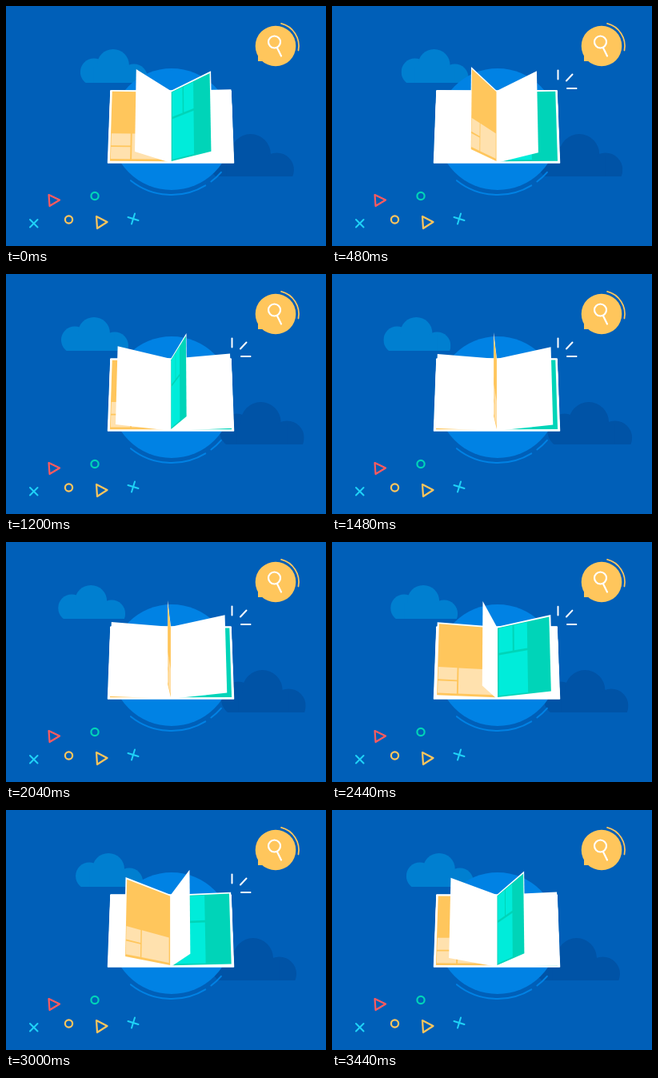
An HTML page with a canvas for the animation above (3480 ms loop, 400 px wide and 300 px high).

```html
<!DOCTYPE html>
<html lang="en">
<head>
<meta charset="utf-8">
<title>Flipping book</title>
<style>
  html, body { margin: 0; width: 100%; height: 100%; overflow: hidden; background: #005fb8; }
  canvas { display: block; }
</style>
</head>
<body>
<canvas id="stage" width="400" height="300"></canvas>
<script>
const ctx = document.getElementById('stage').getContext('2d');
const LOOP = 3480, BURST = 870, RAD = Math.PI / 180;
const YELLOW = '#ffc65c', TEAL = '#00d4b8', CYAN = '#1fd3f7', WHITE = '#fff', GLOW = '#0082e4';

// Flip progress in degrees at given times; a pair of leaves follows every PAIR degrees.
const PAIR = 143, LEAD = 76.5;
const flip = [[0, 54.6], [920, 475], [1480, 725], [2040, 1011], [2440, 1220],
              [3000, 1537.6], [3440, 1756], [LOOP, 54.6 + 12 * PAIR]];

// Cells as [u0, v0, u1, v1]: u from spine to outer edge, v from top to bottom.
const orangePage = { fill: YELLOW, light: '#ffe1ae',
  cells: [[.65, .6, .96, .765], [.65, .785, .96, .95], [.04, .6, .625, .95]] };
const tealPage = { fill: TEAL, light: '#00ecda',
  cells: [[.04, .03, .29, .37], [.32, .03, .56, .37], [.04, .4, .56, .96]] };

const clamp = x => Math.max(0, Math.min(1, x));

function polygon(points, color) {
  ctx.beginPath();
  points.forEach(p => ctx.lineTo(...p));
  ctx.closePath();
  ctx.fillStyle = color;
  ctx.fill();
}

function disc(x, y, r, color) {
  ctx.beginPath();
  ctx.arc(x, y, r, 0, 7);
  ctx.fillStyle = color;
  ctx.fill();
}

function stroke(color, width) {
  ctx.strokeStyle = color;
  ctx.lineWidth = width;
  ctx.stroke();
}

function arc(x, y, r, from, to, color, width = 2) {
  ctx.beginPath();
  ctx.arc(x, y, r, from * RAD, to * RAD);
  stroke(color, width);
}

function line(points, color, width = 2, closed = false) {
  ctx.beginPath();
  points.forEach(p => ctx.lineTo(...p));
  if (closed) ctx.closePath();
  stroke(color, width);
}

function cloud(x, y, scale, color) {
  ctx.save();
  ctx.translate(x, y);
  ctx.scale(scale, scale);
  ctx.beginPath();
  ctx.rect(0, -50, 84, 50);
  ctx.clip();
  disc(17, -13.5, 17, color);
  disc(41, -22, 20, color);
  disc(67, -6.5, 17, color);
  ctx.fillRect(17, -20, 50, 20);
  ctx.restore();
}

function flipAt(t) {
  const i = flip.findIndex(([time]) => time > t);
  const [t0, a] = flip[i - 1], [t1, b] = flip[i];
  return a + (b - a) * (t - t0) / (t1 - t0);
}

// Softens the lift-off and the landing of a leaf.
function leafAngle(x) {
  if (x < 12) return 12 * Math.exp((x - 12) / 12);
  if (x > 160) return 180 - 20 * Math.exp((160 - x) / 20);
  return x;
}

function drawLeaf({ angle, colored }) {
  const cos = Math.cos(angle * RAD), sin = Math.sin(angle * RAD);
  const at = (u, v) => [206 - u * (75.5 + 3 * v) * cos, 106 + 90 * v - u * (33 - 16 * v) * sin];
  const quad = (u0, v0, u1, v1, color) =>
    polygon([at(u0, v0), at(u1, v0), at(u1, v1), at(u0, v1)], color);
  quad(0, 0, 1, 1, WHITE);
  if (!colored) return;
  const page = angle < 90 ? orangePage : tealPage;
  quad(.015, .02, .97, .98, page.fill);
  page.cells.forEach(cell => quad(...cell, page.light));
}

function drawBook(t) {
  const base = [[131, 106], [281, 106], [284.5, 196], [127.5, 196]];
  polygon(base, WHITE);
  line(base, WHITE, 1.5, true);
  const x = flipAt(t), leaves = [];
  const first = Math.floor((x - 400) / PAIR);
  for (let n = first; n < first + 6; n++) {
    leaves.push({ angle: leafAngle(x - n * PAIR), colored: false });
    leaves.push({ angle: leafAngle(x + LEAD - n * PAIR), colored: true });
  }
  // Leaves closest to upright lie on top.
  leaves.sort((a, b) => Math.abs(b.angle - 90) - Math.abs(a.angle - 90)).forEach(drawLeaf);
}

function drawBurst(t) {
  const p = t % BURST;
  const grow = clamp((p - 10) / 80) * (1 - clamp((p - 700) / 65));
  if (!grow) return;
  const ray = (x, y, dx, dy) => line([[x, y], [x + dx * grow, y + dy * grow]], WHITE);
  ray(282.5, 91.5, 0, -11);
  ray(293, 93.5, 7.5, -8);
  ray(294, 103, 11.5, 0);
}

function drawDecor() {
  disc(337, 50, 25.3, YELLOW);
  polygon([[315, 56], [315, 69], [326, 69]], YELLOW);
  arc(337, 50, 29, -76, 11, YELLOW, 1.7);
  arc(335.5, 45, 7.5, 0, 360, WHITE, 2.2);
  line([[338.8, 52], [344, 62.5]], WHITE, 2.2);

  line([[53.5, 236], [67, 242.5], [54.5, 250]], '#ff5b5f', 2.2, true);
  line([[113, 263], [126.5, 270], [114, 278]], YELLOW, 2.2, true);
  arc(111, 237.5, 4.6, 0, 360, TEAL, 2.2);
  arc(78.5, 267, 4.6, 0, 360, YELLOW, 2.2);
  line([[30, 267], [39.5, 276.5]], CYAN);
  line([[39.5, 267], [30, 276.5]], CYAN);
  line([[152.5, 264], [165.5, 268]], CYAN);
  line([[161, 259.5], [157, 272.5]], CYAN);
}

function draw(now) {
  const t = now % LOOP;
  const drift = -Math.cos(Math.PI * (t - 1730) / 1800);
  ctx.lineCap = ctx.lineJoin = 'round';
  ctx.fillStyle = '#005fb8';
  ctx.fillRect(0, 0, 400, 300);
  cloud(78 + 15 * drift, 96, 1, '#007fd0');
  cloud(262 - 8 * drift, 213, 1.26, '#0053a6');
  disc(207, 154, 76, GLOW);
  arc(207, 154, 82, 59, 128.5, GLOW);
  arc(207, 154, 82, 41, 53, GLOW);
  drawBook(t);
  drawBurst(t);
  drawDecor();
  requestAnimationFrame(draw);
}
requestAnimationFrame(draw);
</script>
</body>
</html>
```
